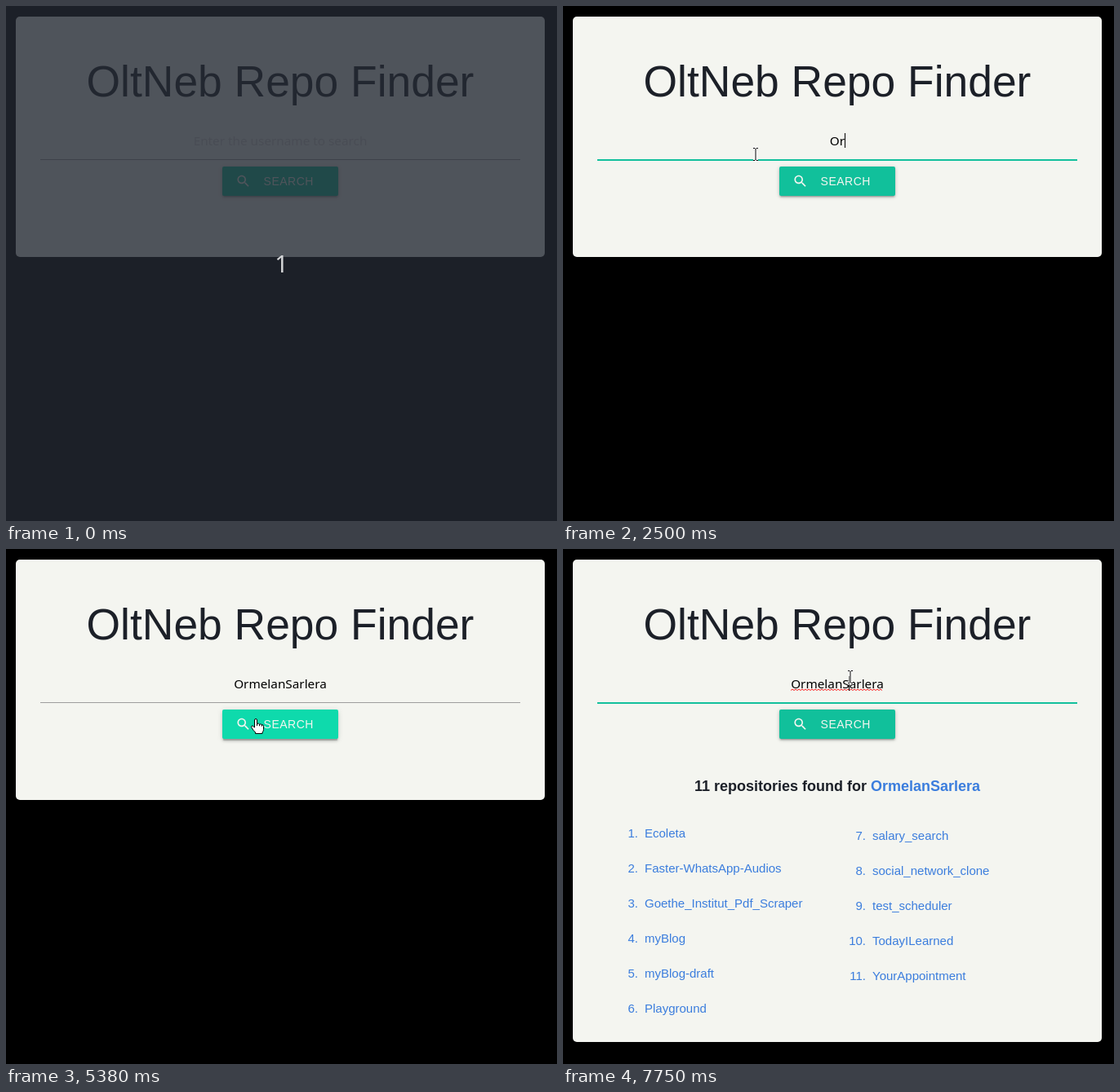
An HTML page that plays this animation: 675 px wide and 632 px high, repeating every 8 s.

```html
<!DOCTYPE html>
<html lang="en">
<head>
<meta charset="utf-8">
<title>Repo finder</title>
<style>
  html, body { margin: 0; width: 100%; height: 100%; overflow: hidden; background: #000; }
  div, svg { position: absolute; }
  svg { left: 0; top: 0; }
  text { font-family: "Liberation Sans", Arial, sans-serif; white-space: pre; }
  #card { left: 12px; top: 13px; width: 648px; border-radius: 5px; background: #f4f5f0; }
  #button { left: 265px; top: 197px; width: 142px; height: 36px; border-radius: 2px; overflow: hidden;
    box-shadow: 0 2px 2px rgba(0,0,0,.14), 0 3px 1px -2px rgba(0,0,0,.12), 0 1px 5px rgba(0,0,0,.2); }
  #button.hover { box-shadow: 0 3px 3px rgba(0,0,0,.14), 0 1px 7px rgba(0,0,0,.12), 0 3px 1px -1px rgba(0,0,0,.2); }
  #ripple { border-radius: 50%; background: #fff; transform: translate(-50%, -50%); left: 41px; top: 12px; }
  #veil { inset: 0; background: rgba(36,41,51,.787); }
  .field, #count { font-family: "Noto Sans", "Open Sans", sans-serif; font-size: 15.3px; }
  #results { fill: #3b7ddd; font-size: 15px; }
</style>
</head>
<body>
<div id="card"></div>
<div id="button"><div id="ripple"></div></div>
<svg width="675" height="632" viewBox="0 0 675 632">
  <text x="336" y="111" font-size="53.4" text-anchor="middle" fill="#1c2028">OltNeb Repo Finder</text>
  <text id="hint" class="field" x="336" y="171" text-anchor="middle" fill="#d1d1d1">Enter the username to search</text>
  <text id="typed" class="field" x="336" y="171" text-anchor="middle" fill="#000"></text>
  <path id="squiggle" fill="none" stroke="#f22" stroke-width="1"/>
  <rect id="caret" y="156" width="1" height="18"/>
  <rect x="42" y="188" width="588" height="1" fill="#9e9e9e"/>
  <rect id="focus" x="42" y="188" width="588" height="2" fill="#12c09c"/>
  <g fill="#f4f5f0">
    <path transform="translate(281 205.2) scale(.8125)" d="M15.5 14h-.79l-.28-.27C15.41 12.59 16 11.11 16 9.5 16 5.91 13.09 3 9.5 3S3 5.91 3 9.5 5.91 16 9.5 16c1.61 0 3.09-.59 4.23-1.57l.27.28v.79l5 4.99L20.49 19l-4.99-5zm-6 0C7.01 14 5 11.99 5 9.5S7.01 5 9.5 5 14 7.01 14 9.5 11.99 14 9.5 14z"/>
    <text x="315.6" y="220" font-size="14" letter-spacing=".5">SEARCH</text>
  </g>
  <g id="results">
    <text x="336" y="297" font-size="18" font-weight="bold" text-anchor="middle"><tspan fill="#1c2028">11 repositories found for </tspan><tspan id="owner"></tspan></text>
  </g>
  <g id="beam" fill="none">
    <path id="beamShape" stroke="#fff" stroke-width="2.6" d="M-3-7.5h2l1 1 1-1h2M0-6.5v13M-3 7.5h2l1-1 1 1h2"/>
    <use href="#beamShape" style="stroke:#000"/>
    <path stroke="#000" d="M-3-7.5h2l1 1 1-1h2M0-6.5v13M-3 7.5h2l1-1 1 1h2"/>
  </g>
  <g id="hand" stroke="#000" stroke-linejoin="round">
    <path fill="#fff" d="M-1.5 1.5a1.5 1.5 0 0 1 3 0V6q2.5-1 3 .6 2-.7 2.7.6 2.3-.4 2.3 1.8v4q0 2-1.5 3.5v1.5h-8.5v-1.5q-2.5-2-5-6.5 0-2 2-1.3l2 1.8z"/>
    <path fill="none" d="M1.5 6v2.5M4.5 6.6v2.2M7.2 7.2v2"/>
  </g>
</svg>
<div id="veil"><svg width="675" height="632"><text id="count" x="337.5" y="327" style="font-size:29px" text-anchor="middle" fill="#d4d5d7">1</text></svg></div>
<script>
const $ = id => document.getElementById(id);
const show = (id, on) => $(id).style.display = on ? '' : 'none';
const LOOP = 8000, TICK = 125;
const user = 'OrmelanSarlera';
const repos = ['Ecoleta', 'Faster-WhatsApp-Audios', 'Goethe_Institut_Pdf_Scraper', 'myBlog', 'myBlog-draft',
  'Playground', 'salary_search', 'social_network_clone', 'test_scheduler', 'TodayILearned', 'YourAppointment'];

// Each track lists [tick, values...]; a value holds until the next entry.
const typing = [[0, 0], [20, 2], [21, 3], [22, 4], [23, 6], [24, 7], [26, 8], [27, 9], [29, 11], [30, 13], [31, 14]];
const focus = [[0, 0], [16, .5], [17, 1], [40, .5], [41, 0], [61, .5], [62, 1]];
const hover = [[0, 0], [36, .5], [37, 1], [57, .5], [58, .2], [59, 0]];
const ripple = [[0, 0, 0], [39, 24, .3], [40, 130, .22], [41, 250, .1], [43, 0, 0]];
const pointer = [[0, 0, 0, ''], [11, 149, 163, 'beam'], [12, 185, 172, 'beam'], [13, 218, 179, 'beam'], [14, 236, 182, 'beam'],
  [35, 262, 187, 'beam'], [36, 296, 198, 'hand'], [37, 301.5, 199.5, 'hand'], [39, 304, 205, 'hand'], [40, 306, 208.5, 'hand'],
  [56, 314, 201, 'hand'], [57, 330, 184, 'beam'], [58, 345, 165, 'beam'], [59, 352, 157, 'beam']];
const at = (track, n) => track.filter(k => k[0] <= n).pop().slice(1);

function addText(x, y, anchor, str) {
  const el = document.createElementNS('http://www.w3.org/2000/svg', 'text');
  el.setAttribute('x', x);
  el.setAttribute('y', y);
  el.setAttribute('text-anchor', anchor);
  el.textContent = str;
  $('results').append(el);
}
repos.forEach((name, i) => {
  const right = i > 5, x = right ? 379 : 100, y = (right ? 357 : 354) + 43 * (i % 6);
  addText(x - 8, y, 'end', i + 1 + '.');
  addText(x, y, 'start', name);
});
$('owner').textContent = user;
$('squiggle').setAttribute('d', 'M279 173.5' + 'l2-1.5 2 1.5'.repeat(28));

function draw(t) {
  const n = Math.floor(t / TICK);
  const [chars] = at(typing, n), [lit] = at(focus, n), [warm] = at(hover, n);

  show('veil', n < 2);
  show('hint', !chars);
  $('typed').textContent = user.slice(0, chars);
  $('focus').style.opacity = lit;

  const found = n >= 46;
  show('results', found);
  $('card').style.height = (found ? 592 : 295) + 'px';

  const again = n >= 61;
  show('squiggle', n === 39 || again);
  show('caret', n >= 16 && n < 35 || again);
  const caretX = again ? $('typed').getEndPositionOfChar(7).x
    : 336 + (chars ? $('typed').getComputedTextLength() / 2 : 0);
  $('caret').setAttribute('x', Math.round(caretX - .5));

  $('button').style.background = `rgb(${17 - 3 * warm},${192 + 26 * warm},${155 + 17 * warm})`;
  $('button').className = warm > .4 ? 'hover' : '';
  const [size, alpha] = at(ripple, n);
  Object.assign($('ripple').style, { width: size + 'px', height: size + 'px', opacity: alpha });

  const [x, y, kind] = at(pointer, n);
  for (const id of ['beam', 'hand']) {
    show(id, id === kind);
    $(id).setAttribute('transform', `translate(${x} ${y})`);
  }
}

const start = performance.now();
function loop() {
  draw((performance.now() - start) % LOOP);
  requestAnimationFrame(loop);
}
loop();
</script>
</body>
</html>
```
